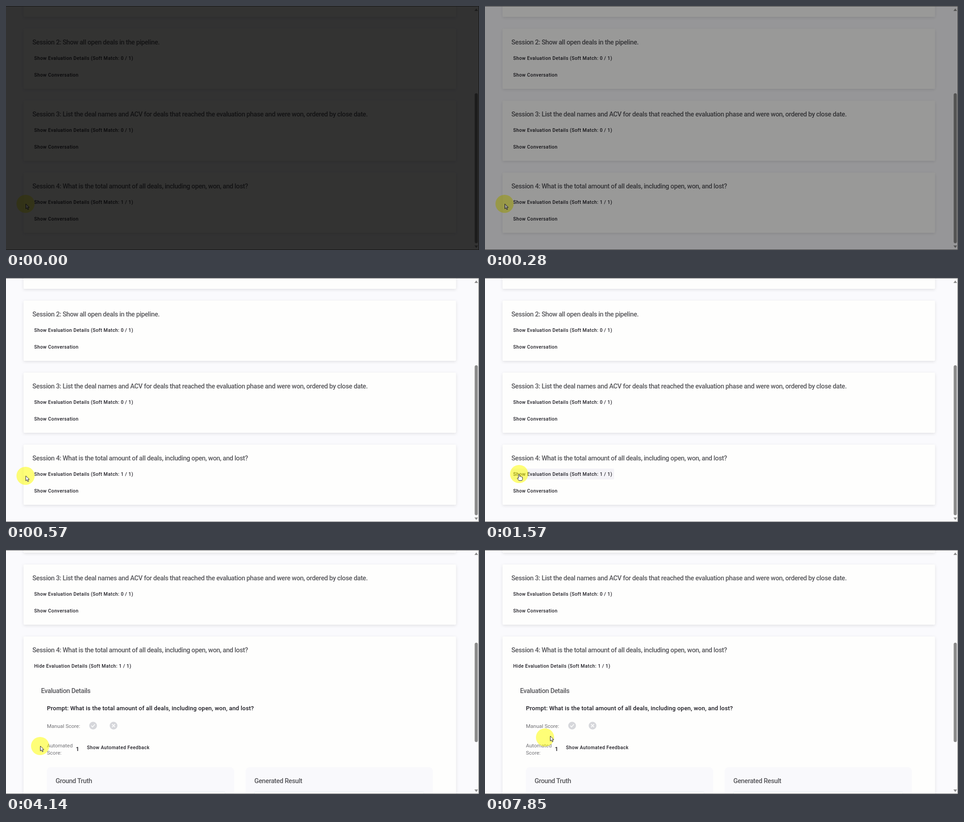
An HTML page that plays this animation: 1040x539 px, repeating every 8 s.

```html
<!DOCTYPE html>
<html lang="en">
<head>
<meta charset="utf-8">
<title>Session evaluation</title>
<style>
  html, body { margin: 0; width: 100%; height: 100%; overflow: hidden; background: #fafafd; }
  svg { display: block; width: 1040px; height: 539px; font-family: Roboto, "Open Sans", sans-serif; }
  .card { fill: #fefefd; filter: drop-shadow(0 2px 3px rgba(0, 0, 0, .1)); }
  .panel { fill: #f9f9fc; }
  .field { fill: #fefefd; stroke: #e6eef2; }
  .title { font-size: 14.5px; font-weight: 500; letter-spacing: -.4px; fill: #57575b; }
  .button { font-size: 10.5px; font-weight: 500; letter-spacing: .39px; fill: #1f1e25; }
  .prompt { font-size: 13px; font-weight: 500; letter-spacing: .2px; fill: #1a1920; }
  .label { font-size: 11.5px; fill: #707074; }
  .icon { fill: none; stroke: #fefefd; stroke-width: 1.7; }
  .pointer { fill: #fff; stroke: #26262c; stroke-width: 1; stroke-linejoin: round; }
</style>
</head>
<body>
<svg viewBox="0 0 1040 539">
  <rect width="1040" height="539" fill="#fafafd"/>
  <g id="page"></g>
  <g fill="#8b8b8b">
    <path d="M1030 11l4-5.500 4 5.500zM1030 529l4 5.500 4-5.500z"/>
    <rect id="thumb" x="1030.500" width="7" rx="3.500"/>
  </g>
  <path d="M0 .5H1039.500V538.500H0" fill="none" stroke="#666"/>
  <g id="spot">
    <circle r="20" fill="#ff0" fill-opacity=".53"/>
    <circle id="ring" fill="none" stroke="#dfbf2a" stroke-width="3"/>
  </g>
  <g id="pointer" class="pointer">
    <path id="arrow" d="M.5 0V11L3 8.700 4.900 12.800 6.700 12 4.900 8H8.300Z"/>
    <path id="hand" d="M-1.500 8V1.500Q-.2 -.5 1 1.500V5.500Q2.500 4.600 3.500 6 5 5.200 5.800 6.600 7.500 6.200 7.500 8V11.500L6 14.500H-.5L-4 9.500Q-3.800 7.500 -1.500 9.500Z"/>
  </g>
  <rect id="shade" width="1040" height="539"/>
</svg>
<script>
const LOOP = 8000, STEP = 1000 / 7, PITCH = 159;
const $ = id => document.getElementById(id);
const clamp = u => Math.min(1, Math.max(0, u));
const smooth = u => (u = clamp(u)) * u * (3 - 2 * u);
const show = (id, on) => $(id).setAttribute("visibility", on ? "visible" : "hidden");
const move = (id, x, y) => $(id).setAttribute("transform", `translate(${x} ${y})`);

const text = (cls, x, y, str, id = "") => `<text class="${cls}" x="${x}" y="${y}" id="${id}">${str}</text>`;
const box = (cls, x, y, w, h, r) => `<rect class="${cls}" x="${x}" y="${y}" width="${w}" height="${h}" rx="${r}"/>`;
const icon = (x, mark) => `<g transform="translate(${x} 565)"><circle r="8.500" fill="#d6d7db"/><path class="icon" d="${mark}"/></g>`;
const panel = (x, title) => box("panel", x, 657, 411.5, 300, 8)
  + text("title", x + 19, 692, title) + box("field", x + 19.5, 710.5, 372, 200, 3);

const question = "What is the total amount of all deals, including open, won, and lost?";
const sessions = [
  ["", 0],
  ["Show all open deals in the pipeline.", 0],
  ["List the deal names and ACV for deals that reached the evaluation phase and were won, ordered by close date.", 0],
  [question, 1]
];

$("page").innerHTML = sessions.map(([title, score], i) => {
  const y = 50 + (i - 1) * PITCH, last = i === 3;
  return `<g transform="translate(0 ${y})">`
    + `<rect class="card" ${last ? 'id="lastCard"' : ""} x="38.500" width="951" height="133" rx="2"/>`
    + (last ? '<rect id="hover" x="58" y="53" width="226" height="24" rx="3" fill="#f4f3f7"/>' : "")
    + text("title", 58, 34.5, `Session ${i + 1}: ${title}`)
    + text("button", 62, 69, `Show Evaluation Details (Soft Match: ${score} / 1)`, "toggle" + i)
    + text("button", 62, 106, "Show Conversation", "talk" + i)
    + "</g>";
}).join("") + '<g id="details">'
  + text("title", 77, 493, "Evaluation Details")
  + text("prompt", 90, 531, "Prompt: " + question)
  + text("label", 90, 569.5, "Manual Score:")
  + icon(191.5, "M-4 0L-1.200 3 4 -3")
  + icon(236.5, "M-3.300 -3.300L3.300 3.300M3.300 -3.300L-3.300 3.300")
  + text("label", 90, 613, "Automated") + text("label", 90, 629, "Score:")
  + text("prompt", 153.5, 621, "1")
  + text("button", 178, 617, "Show Automated Feedback")
  + panel(90, "Ground Truth") + panel(527, "Generated Result")
  + "</g>";

// Approach to the button, then an accelerating departure; step counts from the start of the loop.
function place(step) {
  const near = smooth((step - 5) / 6), away = Math.max(0, (step - 45) / 10) ** 2;
  return [43 + Math.round(32 * near) + Math.trunc(57 * away),
          437 - Math.round(4 * near) - Math.trunc(19 * away)];
}

function draw() {
  const step = Math.floor((performance.now() % LOOP + 9) / STEP);
  const open = step >= 24, scroll = Math.round(177 * smooth((step - 24) / 5));
  const [x, y] = place(step + 1);

  move("page", 0, -scroll);
  show("details", open);
  show("talk3", !open);
  $("lastCard").setAttribute("height", open ? 800 : 133);
  $("toggle3").textContent = `${open ? "Hide" : "Show"} Evaluation Details (Soft Match: 1 / 1)`;

  const height = open ? 1250 : 828, scale = 509 / height;
  $("thumb").setAttribute("y", 15 + (289 + scroll) * scale);
  $("thumb").setAttribute("height", 539 * scale);

  const over = x >= 58 && scroll < 12;
  show("hover", over);
  show("hand", over);
  show("arrow", !over);
  move("pointer", x, y);
  move("spot", ...place(step));

  const clicking = step >= 16 && step < 24;
  show("ring", clicking);
  $("ring").setAttribute("r", clicking ? 3 * (step - 15) : 0);
  $("shade").setAttribute("opacity", clamp(.8 - .2 * step));
  requestAnimationFrame(draw);
}
draw();
</script>
</body>
</html>
```
